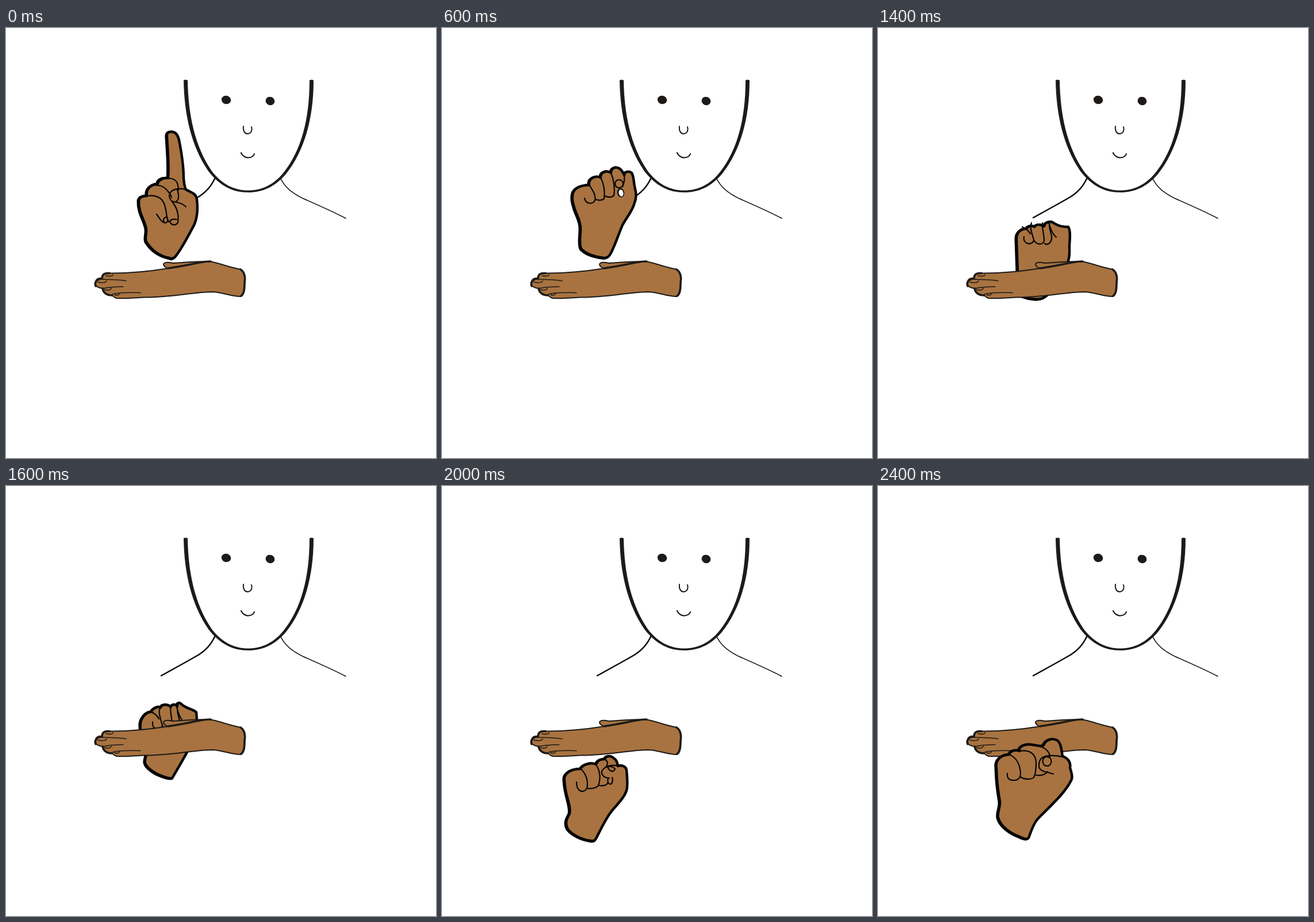
These frames come from a looping animation (748x748 px, 2.6 s). An HTML page with a canvas:

```html
<!DOCTYPE html>
<html lang="en">
<head>
<meta charset="utf-8">
<title>Hand sign</title>
<style>
html, body { margin: 0; width: 100%; height: 100%; overflow: hidden; background: #fff; }
canvas { display: block; width: 100vw; height: 100vh; }
</style>
</head>
<body>
<canvas id="stage" width="748" height="748"></canvas>
<script>
const ctx = document.getElementById('stage').getContext('2d');
const SKIN = '#a87340', INK = '#050505', SOFT = '#1d1a18';
const STEP = 200;

// box: outer bounds of the drawn shape, used to place it elsewhere
const shape = (box, outline, lines) => ({ box, outline: new Path2D(outline), lines: new Path2D(lines) });

const pointing = shape([228, 178, 335, 403],
  `M280 190C279 182 283 180.500 288 180.500C295 180.500 299 186 301 195C305 215 309 240 309 262C310 272 311 278 313 281
   C322 286 331 288 332 298C334 315 333 330 327 343C317 362 305 385 295 397C292 401 288 402 284 400
   C268 397 253 387 244 372C241 365 245 358 244 350C242 335 230 322 231 300C232 294 238 292 245 292
   C243 280 252 272 264 271C264 264 271 260 282 261C284 240 281 210 280 190Z`,
  `M264 270C274 258 292 260 297 268C300 274 300 278 300 282M247 282C252 270 270 272 278 280
   C283 285 287 290 288 295M245 292C262 290 274 296 277 312C280 322 278 328 283 337
   M313 281C300 278 285 280 284 292C285 303 297 307 300 296C301 289 299 285 298 281
   M289 302C297 312 301 325 299 338C296 344 288 344 285 337C286 333 291 332 297 333
   M313 311C308 306 302 304 296 303M262 324C268 332 270 338 277 339C283 338 282 330 278 329C274 330 273 334 275 338`);

const highFist = shape([223, 240, 342, 403],
  `M227 292C227 281 237 274 256 273C254 262 266 256 276 260C275 250 287 247 294 252C294 243 302 241 308 244
   C313 247 315 251 317 256C317 250 326 248 330 252C334 258 333 268 336 280C338 287 338 296 335 304
   C331 320 318 333 313 345C306 362 300 380 294 391C291 398 287 400 282 400C266 398 250 393 242 384
   C238 376 241 360 241 350C242 335 232 322 230 312C227 303 226 298 227 292Z`,
  `M256 273C262 282 268 290 266 300C263 307 250 307 248 296M276 260C281 270 284 282 282 297
   C278 300 272 300 267 298M294 252C299 264 301 280 299 291C296 295 288 295 283 292
   M317 256C318 264 317 270 314 276M301 271a7 7 0 1 0 14 0a7 7 0 1 0 -14 0`);

const curls = `M250 292C258 296 262 300 264 304M253 309C251 318 258 322 264 321C268 320 270 317 270 314
   M266 285C262 295 268 305 270 315C276 325 288 323 288 315C288 305 284 295 285 285
   M297 283C296 295 300 301 301 308C302 318 295 325 289 321M296 284C299 297 303 305 309 310`;

const fist = shape([228, 275, 335, 407],
  `M231 318C229 304 240 293 250 292C254 286 262 282 267 285C269 279 280 279 285 284C288 279 293 279 297 283
   C296 277 300 276 304 279C312 287 325 287 331 293C332 305 333 318 329 329C321 352 302 380 288 403
   C284 405 272 401 262 397C250 391 240 384 239 376C239 368 244 362 242 352C240 340 231 334 231 318Z`,
  curls);

const uprightFist = shape([237, 335, 337, 474],
  `M241 368C240 357 248 349 258 349C261 344 268 343 272 346C275 341 283 341 289 345C290 339 296 337 301 337
   C307 338 310 346 331 346C335 352 334 365 333 378C333 390 334 395 331 405L320 440
   C310 452 295 465 288 469C280 474 262 471 252 467L243 425Z`, '');
uprightFist.lines.addPath(new Path2D(curls), new DOMMatrix([1, 0, 0, 1, 1, 54]));

const hiddenFist = shape([222, 437, 329, 558],
  `M226 466C226 485 229 494 232 503C234 512 225 516 226 523C228 536 248 549 268 555C271 556 273 553 275 550
   L322 482C326 476 325 470 326 464L320 440L230 440Z`,
  `M246 468C250 472 256 470 258 467M262 467C266 471 272 469 276 466`);

const lowFist = shape([209, 468, 326, 621],
  `M213 512C211 502 222 492 241 492C244 485 258 480 268 484C270 478 276 475 283 475C284 470 293 468 298 473
   C304 476 305 482 306 487C314 485 320 488 321 494C322 505 323 515 322 524C321 540 302 556 294 567
   C284 580 276 598 268 613C266 618 262 618 258 617C242 615 226 606 219 597C213 586 217 579 222 570
   C225 555 214 540 213 512Z`,
  `M241 492C251 500 255 515 252 526C248 534 234 534 234 515M267 484C276 495 276 510 272 521
   C268 526 258 527 253 526M284 476C290 480 288 485 285 489M306 487C296 484 283 487 278 496
   C277 502 281 508 291 508M288 489C292 497 298 499 301 492C298 488 292 487 288 489
   M274 521C279 522 286 521 288 517M289 508C287 516 290 520 295 518C297 514 297 510 296 507`);

const frontFist = shape([202, 437, 341, 617],
  `M206 490C204 478 212 468 228 467C230 461 238 458 246 461C244 453 256 448 268 450C276 451 284 454 288 451
   C291 442 302 438 311 442C319 447 319 460 321 470C330 473 336 481 334 490C337 500 339 507 336 512
   C325 535 296 560 277 580C269 590 266 602 262 612C259 616 252 613 246 610C230 604 213 592 209 577
   C207 567 213 560 212 549C210 535 207 525 206 490Z`,
  `M228 467C241 472 247 485 248 499C248 508 243 512 236 512C228 512 224 508 225 500
   M246 461C262 458 274 465 275 480C275 492 274 502 271 507C266 511 255 511 248 506
   M268 450C285 452 298 458 299 471M321 471C305 468 285 467 281 479C278 490 281 494 290 497
   C297 498 301 500 305 501M286.500 479a7.500 8 0 1 0 15 0a7.500 8 0 1 0 -15 0M275 503C283 504 290 503 295 497`);

const poses = [
  { hand: pointing },
  { hand: pointing },
  { hand: pointing, to: [222, 185, 339, 407] },
  { hand: highFist, nail: true },
  { hand: fist, to: [229, 265, 340, 403] },
  { hand: fist },
  { hand: fist, to: [224, 305, 333, 437] },
  { hand: uprightFist },
  { hand: fist, to: [231, 375, 335, 512] },
  { hand: hiddenFist },
  { hand: lowFist },
  { hand: frontFist, to: [197, 453, 337, 634], front: true },
  { hand: frontFist, front: true }
];

const palm = new Path2D(`M156 440C158 435 163 435 167 436C167 428 172 425 180 426.500C215 427 245 424 283 418
   C280 418 274 415 274 411C275 407 283 407 290 409C310 408 325 406 350 406C362 405 375 413 408 420
   C415 424 417 435 415.500 442C415 455 414 463 409 467C395 468 375 459 358 459C320 460 285 469 240 468.500
   C220 470 205 471 192 470C185 467 187 466 184 465C175 466 168 460 168 453C160 452 153 449 156 440Z`);
const palmLines = new Path2D(`M163 437C185 438 200 438 209 440M169 453C182 450 192 450 204 450
   M184 464C190 460 210 460 234 460.500M174 431C180 432 186 432 186 429M160 442C166 444 174 443 175 440
   M171 455C177 457 183 456 183 452M189 464C194 466 198 464 197 461`);
const palmEdges = new Path2D(`M156 449C153 442 160 435 167 436C167 428 172 426 180 426.500
   M168 453C169 460 175 465 184 465M408 420C415 424 417 435 415 443C415 455 414 463 409 466`);
const palmThumb = new Path2D('M282 418C305 415 325 410 340 407.500C345 406.500 350 406 356 406');

const head = new Path2D(`M309 91C310 150 322 205 352 249C372 275 395 286 421 286C447 286 468 276 487 254
   C518 215 535 160 535 91Q531.500 89 528 91C528 160 513 213 484 250C467 272 446 282.500 421 282.500
   C397 282.500 376 272 358 249C328 205 317 150 316 91Q312.500 89 309 91Z`);
const nose = new Path2D('M413 171C412 180 416 184 420 184C425 184 429 180 427 172');
const mouth = new Path2D('M409 217C411 223 418 226 422 225.500C428 225 431 222 432 219');
const leftNeck = new Path2D('M364 260C355 281 340 291 331 296C310 308 290 319 270 330');
const rightNeck = new Path2D('M477 260C484 277 502 290 520 298C545 309 568 319 591 331');

function line(path, width, color) {
  ctx.lineWidth = width;
  ctx.strokeStyle = color;
  ctx.stroke(path);
}

function dot(x, y, rx, ry, turn, color) {
  ctx.fillStyle = color;
  ctx.beginPath();
  ctx.ellipse(x, y, rx, ry, turn, 0, Math.PI * 2);
  ctx.fill();
}

function drawPerson() {
  line(leftNeck, 2.4, INK);
  line(rightNeck, 1.5, INK);
  ctx.fillStyle = SOFT;
  ctx.fill(head);
  dot(383, 125, 8.3, 7.2, 0.3, SOFT);
  dot(459.5, 127, 8, 7.2, 0.4, SOFT);
  line(nose, 2, SOFT);
  line(mouth, 2.2, SOFT);
}

function drawPalm() {
  ctx.fillStyle = SKIN;
  ctx.fill(palm);
  line(palm, 2, SOFT);
  line(palmEdges, 3.6, SOFT);
  line(palmThumb, 3.4, SOFT);
  line(palmLines, 1.5, SOFT);
}

function drawHand({ hand, to = hand.box, nail }) {
  const [x0, y0, x1, y1] = hand.box;
  const sx = (to[2] - to[0]) / (x1 - x0), sy = (to[3] - to[1]) / (y1 - y0);
  ctx.save();
  ctx.translate(to[0] - x0 * sx, to[1] - y0 * sy);
  ctx.scale(sx, sy);
  // shifted stroke makes the left side heavier
  ctx.translate(-1, 0.5);
  line(hand.outline, 5, INK);
  ctx.translate(1, -0.5);
  ctx.fillStyle = SKIN;
  ctx.fill(hand.outline);
  line(hand.outline, 4.4, INK);
  line(hand.lines, 2.2, INK);
  if (nail) {
    dot(311, 286.5, 6, 8, -0.2, INK);
    dot(311.5, 287, 4, 6, -0.2, '#fff');
  }
  ctx.restore();
}

function draw(time) {
  const pose = poses[Math.floor(time / STEP) % poses.length];
  ctx.fillStyle = '#fff';
  ctx.fillRect(0, 0, 748, 748);
  drawPerson();
  if (pose.front) {
    drawPalm();
    drawHand(pose);
  } else {
    drawHand(pose);
    drawPalm();
  }
}

ctx.lineCap = ctx.lineJoin = 'round';
const start = performance.now();
function tick() {
  draw(performance.now() - start);
  requestAnimationFrame(tick);
}
tick();
</script>
</body>
</html>
```
